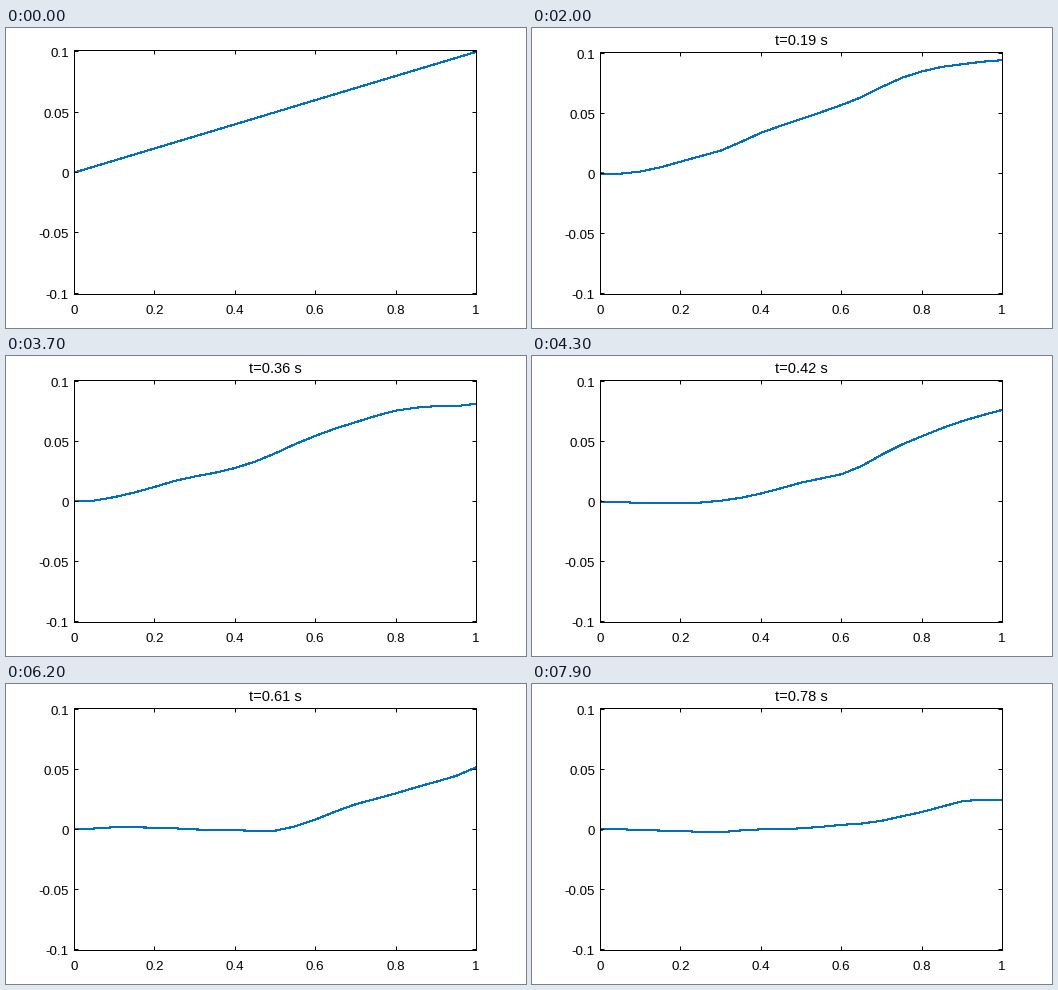
A matplotlib script that plays this animation: 520 by 300 pixels, repeating every 8000 ms.

```python
import numpy as np
import matplotlib.pyplot as plt
from matplotlib.animation import FuncAnimation

W, H, DPI = 520, 300, 100
PT = 72 / DPI                      # points per pixel
FRAMES, INTERVAL = 80, 100
LEFT, RIGHT, BOTTOM = 68, 470, 266
TOP_PLAIN, TOP_TITLED = 22, 24
Y_LIM = 0.101
TICK = 4

plt.rcParams["font.family"] = "Liberation Sans"

# Clamped beam with a heavy tip mass, explicit finite differences
N = 20
DX, DT = 1 / N, 5e-4
STEPS = 20                         # time steps per frame
STIFFNESS, TIP_MASS = 5.0, 5.0
grid = np.linspace(0, 1, N + 1)


def acceleration_matrix():
    bend = np.zeros((N, N + 1))    # curvature at nodes 0..N-1
    bend[0, 1] = 2
    for i in range(1, N):
        bend[i, i - 1:i + 2] = 1, -2, 1
    bend /= DX**2
    weight = np.full(N, DX)
    weight[0] /= 2
    mass = np.full(N + 1, DX)
    mass[-1] = TIP_MASS
    acc = -STIFFNESS * bend.T @ (weight[:, None] * bend) / mass[:, None]
    acc[0] = 0                     # fixed end
    return acc


def simulate(count):
    acc = acceleration_matrix()
    now = nxt = 0.1 * grid
    states = []
    for n in range(count * STEPS):
        if n % STEPS == 0:
            states.append(now)
        now, nxt = nxt, 2 * nxt - now + DT**2 * acc @ nxt
    return states


states = simulate(FRAMES)


def to_x(v):
    return LEFT + v * (RIGHT - LEFT)


def to_y(v, top):
    return BOTTOM - (v + Y_LIM) / (2 * Y_LIM) * (BOTTOM - top)


fig = plt.figure(figsize=(W / DPI, H / DPI), dpi=DPI, facecolor="white")
ax = fig.add_axes([0, 0, 1, 1])
ax.set_xlim(0, W)
ax.set_ylim(H, 0)
ax.axis("off")


def stroke(color="black", width=1.0, **kw):
    return ax.plot([], [], color=color, lw=width * PT, **kw)[0]


def label(x, y, text, ha="center", size=13.33):
    return ax.text(x, y, text, ha=ha, va="baseline", fontsize=size * PT,
                   color="black")


curve = stroke("#0072BD", 1.05, antialiased=False, solid_joinstyle="round",
               solid_capstyle="butt")
frame_line = stroke(snap=True, solid_capstyle="projecting")
tick_line = stroke(snap=True, solid_capstyle="butt")
title = label(269.5, 17, "", size=14.67)

x_ticks = np.arange(6) / 5
y_ticks = np.arange(-2, 3) / 20
for v in x_ticks:
    label(to_x(v), 286, f"{v:g}")
y_labels = [label(63, 0, f"{v:g}", ha="right") for v in y_ticks]


def place_axes(top):
    frame_line.set_data([LEFT, RIGHT, RIGHT, LEFT, LEFT],
                        [BOTTOM, BOTTOM, top, top, BOTTOM])
    xs, ys = [], []

    def tick(x0, y0, x1, y1):
        xs.extend([x0, x1, np.nan])
        ys.extend([y0, y1, np.nan])

    for v in x_ticks:
        x = to_x(v)
        tick(x, BOTTOM, x, BOTTOM - TICK)
        tick(x, top, x, top + TICK)
    for v, text in zip(y_ticks, y_labels):
        y = to_y(v, top)
        tick(LEFT, y, LEFT + TICK, y)
        tick(RIGHT, y, RIGHT - TICK, y)
        text.set_y(round(y + 6))
    tick_line.set_data(xs, ys)


def update(i):
    top = TOP_TITLED if i else TOP_PLAIN
    n = max(i - 1, 0)
    place_axes(top)
    title.set_text(f"t={n * STEPS * DT:g} s" if i else "")
    # half a pixel brings the curve onto pixel centres
    curve.set_data(to_x(grid) + 0.5, to_y(states[n], top) + 0.5)
    return curve, frame_line, tick_line, title, *y_labels


anim = FuncAnimation(fig, update, frames=FRAMES, interval=INTERVAL,
                     repeat=True, repeat_delay=0, blit=False)
plt.show()
```
